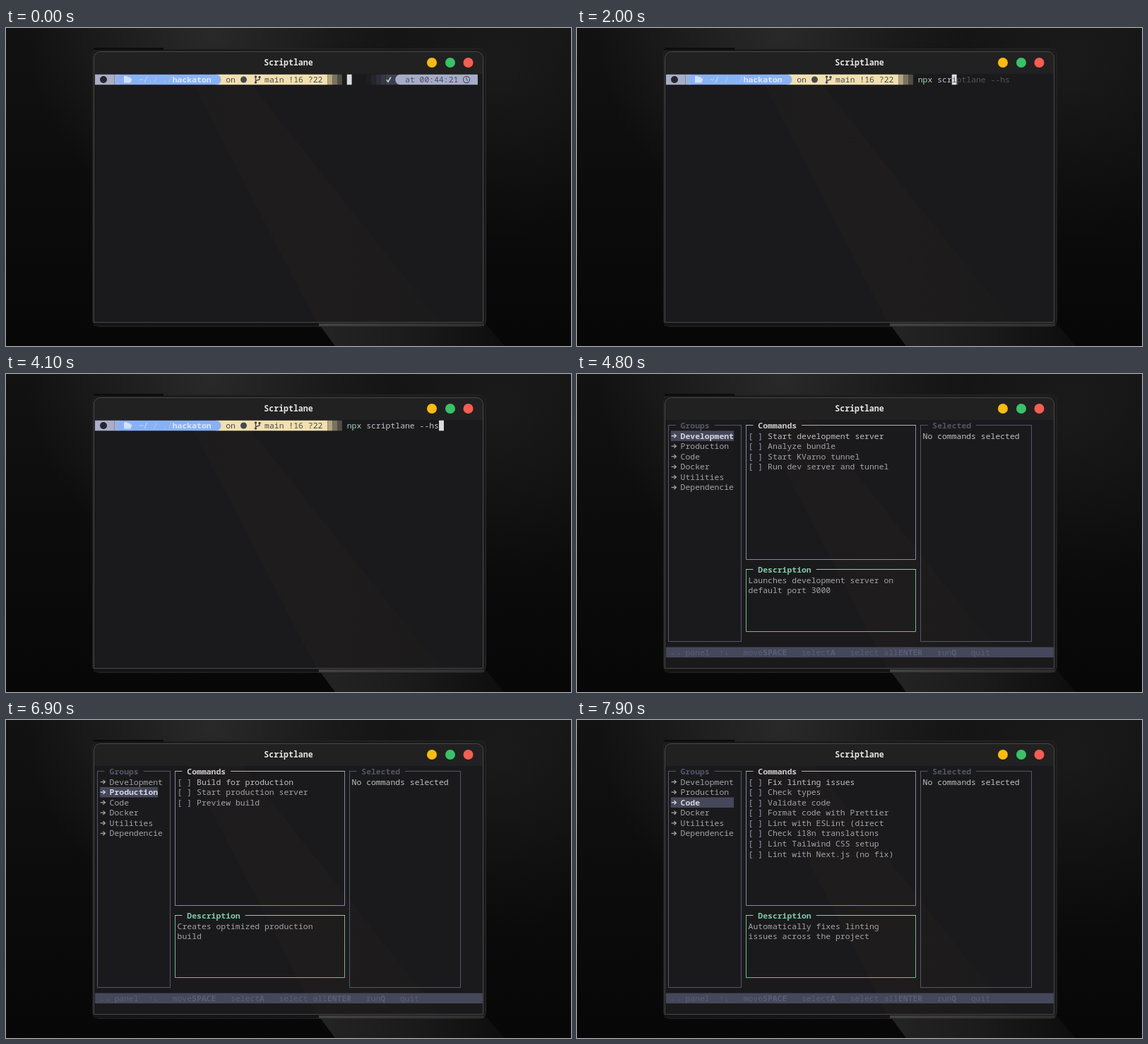
An HTML page with a canvas for the animation above (8000 ms loop, 800 px wide and 450 px high).

```html
<!DOCTYPE html>
<html lang="en">
<head>
<meta charset="utf-8">
<title>Terminal</title>
<style>
html, body { margin: 0; width: 100%; height: 100%; overflow: hidden; background: #0b0b0b; }
canvas { display: block; width: 800px; height: 450px; }
</style>
</head>
<body>
<canvas id="stage" width="800" height="450"></canvas>
<script>
const W = 800, H = 450, LOOP = 8000;
const X0 = 126, CELL = 6.86, Y0 = 73, ROW = 14.58;
const FONT = '"Noto Sans Mono", "DejaVu Sans Mono", monospace';
const stage = document.getElementById('stage').getContext('2d');
let ctx = stage;

const col = c => X0 + c * CELL;
const row = r => Y0 + r * ROW;

function rect(x, y, w, h, fill) {
  ctx.fillStyle = fill;
  ctx.fillRect(x, y, w, h);
}

function cells(c, r, n, fill) {
  rect(col(c), row(r) - ROW / 2, n * CELL, ROW, fill);
}

function text(str, c, r, fill, bold) {
  ctx.font = `${bold ? 700 : 400} 11.43px ${FONT}`;
  ctx.textAlign = 'left';
  ctx.fillStyle = fill;
  ctx.fillText(str, col(c), row(r) + 4);
}

function dot(x, y, r, fill) {
  ctx.fillStyle = fill;
  ctx.beginPath();
  ctx.arc(x, y, r, 0, Math.PI * 2);
  ctx.fill();
}

function path(points, color, width = 1) {
  ctx.strokeStyle = color;
  ctx.lineWidth = width;
  ctx.beginPath();
  points.forEach(([x, y], i) => i ? ctx.lineTo(x, y) : ctx.moveTo(x, y));
  ctx.stroke();
}

function polygon(points, fill) {
  ctx.fillStyle = fill;
  ctx.beginPath();
  points.forEach(([x, y]) => ctx.lineTo(x, y));
  ctx.fill();
}

function roundBox(x, y, w, h, radii, fill, stroke) {
  ctx.beginPath();
  ctx.roundRect(x, y, w, h, radii);
  if (fill) { ctx.fillStyle = fill; ctx.fill(); }
  if (stroke) { ctx.strokeStyle = stroke; ctx.lineWidth = 1; ctx.stroke(); }
}

function linear(x1, y1, x2, y2, ...stops) {
  const g = ctx.createLinearGradient(x1, y1, x2, y2);
  stops.forEach((s, i) => g.addColorStop(i / (stops.length - 1), s));
  return g;
}

function glow(x, y, r, color) {
  const g = ctx.createRadialGradient(x, y, 0, x, y, r);
  g.addColorStop(0, `rgba(${color})`);
  g.addColorStop(1, `rgba(${color.replace(/[^,]+$/, '0')})`);
  rect(0, 0, W, H, g);
}

function drawBackdrop() {
  rect(0, 0, W, H, linear(0, 0, 0, H, '#121212', '#0c0c0c', '#070708'));
  glow(290, 10, 260, '95,95,95,.3');
  glow(700, 60, 240, '60,60,60,.22');
  polygon([[440, 415], [676, 415], [706, 450], [466, 450]],
    linear(440, 0, 706, 0, '#242424', '#1b1b1b', '#0d0d0d'));

  roundBox(122.5, 29.5, 557, 393, 9, '#1b1b1b', '#242425');
  rect(124, 417, 552, 5, '#151515');
  rect(443, 418, 234, 4, linear(443, 0, 677, 0, '#424242', '#2d2d2d'));
  rect(124, 28, 99, 3, '#0c0c0c');

  roundBox(124.5, 33.5, 551, 383, [9, 9, 0, 0], '#1a1a1c');
  ctx.save();
  ctx.clip();
  rect(124, 33, 552, 32, '#212122');
  polygon([[258, 65], [335, 65], [615, 417], [440, 417]],
    linear(258, 0, 615, 0, '#1d1c1d', '#1e1c1c', '#1c1b1c'));
  ctx.restore();
  roundBox(124.5, 33.5, 551, 383, [9, 9, 0, 0], null, '#48484a');

  ctx.font = `700 11.55px ${FONT}`;
  ctx.textAlign = 'center';
  ctx.fillStyle = '#e6e4e4';
  ctx.fillText('Scriptlane', 400, 53);
  dot(603, 49, 7, '#fcbc0b');
  dot(629, 49, 7, '#38c367');
  dot(654.5, 49, 7, '#fb5c51');
}

function drawPrompt() {
  const y = row(0) - ROW / 2, ink = '#454a52';
  cells(0, 0, 4, '#a9aec6');
  cells(4, 0, 1, '#9fb0da');
  cells(25, 0, 23, '#f2e0b0');
  roundBox(col(4.8), y, col(26) - col(4.8), ROW, [0, 7, 7, 0], '#89b2f6');
  ['#b0a482', '#7a7360', '#514d45'].forEach((c, i) => cells(48 + i, 0, 1, c));

  dot(138, 73, 5, '#26262f');
  polygon([[167, 68], [171, 68], [172.5, 69.5], [176, 69.5], [176, 71.5], [178.5, 71.5], [176.5, 77.5], [167, 77.5]], '#d3e0f8');
  text('~/', 9, 0, '#d0def8');
  text('./ ./', 11, 0, 'rgba(208,222,248,.5)');
  text('hackaton', 16, 0, '#dbe6fb', true);
  text('on', 27, 0, ink);
  dot(336.5, 73, 4.5, ink);
  path([[353.5, 69], [353.5, 77]], ink, 1.3);
  path([[353.5, 74.5], [359, 73], [359, 70]], ink, 1.3);
  [[353.5, 69], [353.5, 77], [359, 69.5]].forEach(([x, y]) => dot(x, y, 1.7, ink));
  text('main !16 ?22', 35, 0, ink);
}

function drawClock() {
  ['#1e1e22', '#25262c', '#2d2e38', '#363845'].forEach((c, i) => cells(56 + i, 0, 1, c));
  cells(60, 0, 3, '#3d3f50');
  path([[538.8, 73.2], [541, 76], [545, 69.5]], '#c6d2c6', 1.6);
  roundBox(col(62), row(0) - ROW / 2, col(79) - col(62), ROW, [7, 0, 0, 7], '#a7adc6');
  text('at 00:44:21', 64, 0, '#4a4d5e');
  ctx.strokeStyle = '#4a4d5e';
  ctx.lineWidth = 1.1;
  ctx.beginPath();
  ctx.arc(652, 73, 4.6, 0, Math.PI * 2);
  ctx.stroke();
  path([[652, 70], [652, 73.2], [654.2, 74.5]], '#4a4d5e');
}

const LINE = 'npx scriptlane --hs', START = 52;
// [time, characters typed]
const KEYS = [
  [600, 1], [700, 2], [800, 3], [900, 4], [1600, 5], [1800, 6], [2000, 7], [2100, 8],
  [2300, 10], [2400, 11], [2500, 12], [2700, 14], [3000, 15], [3200, 16], [3300, 17],
  [3400, 18], [3700, 19]
];
const ENTER = 4400, OPEN = 4700;
const hidden = [[400, 600], [1500, 1600], [4300, ENTER]];
const latest = (list, t) => list.filter(e => e[0] <= t).pop();

function drawShell(t) {
  const typed = (latest(KEYS, t) || [0, 0])[1];
  const entered = t >= ENTER;
  drawPrompt();
  if (!typed) drawClock();
  else {
    text(LINE.slice(typed), START + typed, 0, '#55555b');
    text(LINE.slice(0, Math.min(typed, 3)), START, 0, '#a5d3b9');
    if (typed > 4) text(LINE.slice(4, typed), START + 4, 0, '#c3c3cb');
  }
  if (hidden.some(([a, b]) => t >= a && t < b)) return;
  if (entered) return cells(0, 1, 1, '#dcdcde');
  cells(START + typed, 0, 1, '#dcdcde');
  if (typed) text(LINE[typed] || '', START + typed, 0, '#55555b');
}

const GROUPS = [
  { name: 'Development', mark: 11,
    list: ['Start development server', 'Analyze bundle', 'Start KVarno tunnel', 'Run dev server and tunnel'],
    about: ['Launches development server on', 'default port 3000'] },
  { name: 'Production', mark: 10,
    list: ['Build for production', 'Start production server', 'Preview build'],
    about: ['Creates optimized production', 'build'] },
  { name: 'Code', mark: 11,
    list: ['Fix linting issues', 'Check types', 'Validate code', 'Format code with Prettier',
      'Lint with ESLint (direct', 'Check i18n translations', 'Lint Tailwind CSS setup', 'Lint with Next.js (no fix)'],
    about: ['Automatically fixes linting', 'issues across the project'] },
  { name: 'Docker', mark: 6,
    list: ['Start containers', 'Stop containers', 'Rebuild images'],
    about: ['Starts all Docker containers', 'in the background'] },
  { name: 'Utilities', mark: 9,
    list: ['Clean project files', 'Create .env file'],
    about: ['Removes all generated directories', 'and cache'] },
  { name: 'Dependencie', mark: 11, list: [], about: [] }
];
// [time, group]
const MOVES = [[OPEN, 0], [6900, 1], [7200, 2], [7300, 3], [7400, 4], [7700, 3], [7900, 2]];
const BAR = '#45475a';

function panel(title, c1, r1, c2, r2, side, top, label, bold) {
  const snap = v => Math.floor(v) + .5;
  const [x1, x2] = [c1, c2].map(c => snap(col(c + .5)));
  const [y1, y2] = [r1, r2].map(r => snap(row(r) - .3));
  path([[x1, y1], [x1, y2], [x2, y2], [x2, y1]], side);
  path([[x1 - .5, y1], [col(c1 + 2), y1]], top);
  path([[col(c1 + 4 + title.length), y1], [x2 + .5, y1]], top);
  text(title, c1 + 3, r1, label, bold);
}

function arrow(r, color) {
  const x = col(1) + .8, y = row(r);
  path([[x, y], [x + 6.5, y]], color, 1.3);
  path([[x + 3.8, y - 2.7], [x + 6.7, y], [x + 3.8, y + 2.7]], color, 1.3);
}

function drawMenu(t) {
  const pick = latest(MOVES, t)[1];
  const group = GROUPS[pick];
  const inList = t >= 6400 && t < 6800;
  const dim = '#55566a', soft = '#a5a2a8', lit = '#c2bec2';

  panel('Groups', 0, 0, 15, 21, dim, dim, dim, true);
  panel('Commands', 16, 0, 51, 13, '#8486a6', '#b4b1b4', '#cfcbd0', true);
  panel('Description', 16, 14, 51, 20, '#6fb795', '#a9c0b2', '#7fcba6', true);
  panel('Selected', 52, 0, 75, 21, dim, dim, dim, true);

  GROUPS.forEach(({ name, mark }, i) => {
    const on = i === pick && !inList;
    if (on) cells(1, i + 1, mark + 2, BAR);
    arrow(i + 1, on ? '#d6d3d8' : soft);
    text(name, 3, i + 1, on ? '#d9d6dc' : soft, on);
  });

  group.list.forEach((name, i) => {
    const on = inList && i === 0;
    if (on) {
      cells(17, 1, 3, BAR);
      cells(21, 1, name.length, BAR);
    }
    text('[ ]', 17, i + 1, on ? '#c9c7d2' : '#9a9caf');
    text(name, 21, i + 1, i ? soft : lit);
  });
  group.about.forEach((s, i) => text(s, 17, 15 + i, soft));
  text('No commands selected', 53, 1, lit);

  cells(0, 22, 80, BAR);
  const hint = '#5c5f74';
  text('    panel       move        select    select all        run    quit', 0, 22, hint);
  text('                    SPACE         A             ENTER      Q', 0, 22, hint, true);
  text('←→', 1, 22, hint, true);
  text('↑↓', 11, 22, hint, true);
}

const backdrop = document.createElement('canvas');
backdrop.width = W;
backdrop.height = H;
ctx = backdrop.getContext('2d');
drawBackdrop();
ctx = stage;

function frame() {
  const t = performance.now() % LOOP;
  ctx.drawImage(backdrop, 0, 0);
  if (t < OPEN) drawShell(t);
  else drawMenu(t);
  requestAnimationFrame(frame);
}
frame();
</script>
</body>
</html>
```
